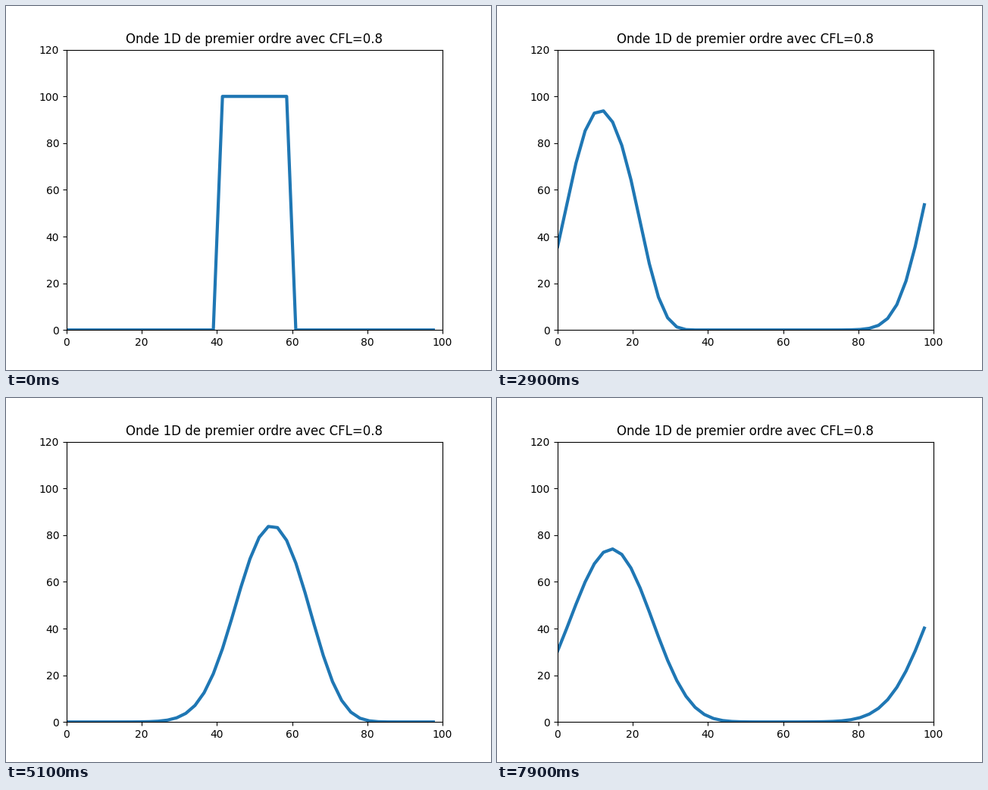
Animation of 640x480 px, one loop 8000 ms. Source, as a matplotlib script:

```python
import numpy as np
import matplotlib.pyplot as plt
from matplotlib.animation import FuncAnimation

LENGTH, CELLS, CFL = 100, 41, 0.8
FRAMES, INTERVAL = 80, 100

x = np.arange(CELLS) * LENGTH / CELLS


def advance(u):
    """One upwind step; the end cells mirror the opposite inner cells."""
    new = u.copy()
    new[1:] -= CFL * (u[1:] - u[:-1])
    new[0], new[-1] = new[-2], new[1]
    return new


states = [np.where((x > 40) & (x < 60), 100.0, 0.0)]
while len(states) < FRAMES:
    states.append(advance(states[-1]))

fig, ax = plt.subplots(figsize=(6.4, 4.8), dpi=100)
ax.set(xlim=(0, 100), ylim=(0, 120))
ax.set_title("Onde 1D de premier ordre avec CFL=0.8")
line, = ax.plot(x, states[0], color="tab:blue", lw=3)


def update(i):
    line.set_ydata(states[i])
    return line,


anim = FuncAnimation(fig, update, frames=FRAMES, interval=INTERVAL,
                     repeat=True, repeat_delay=0)
plt.show()
```
